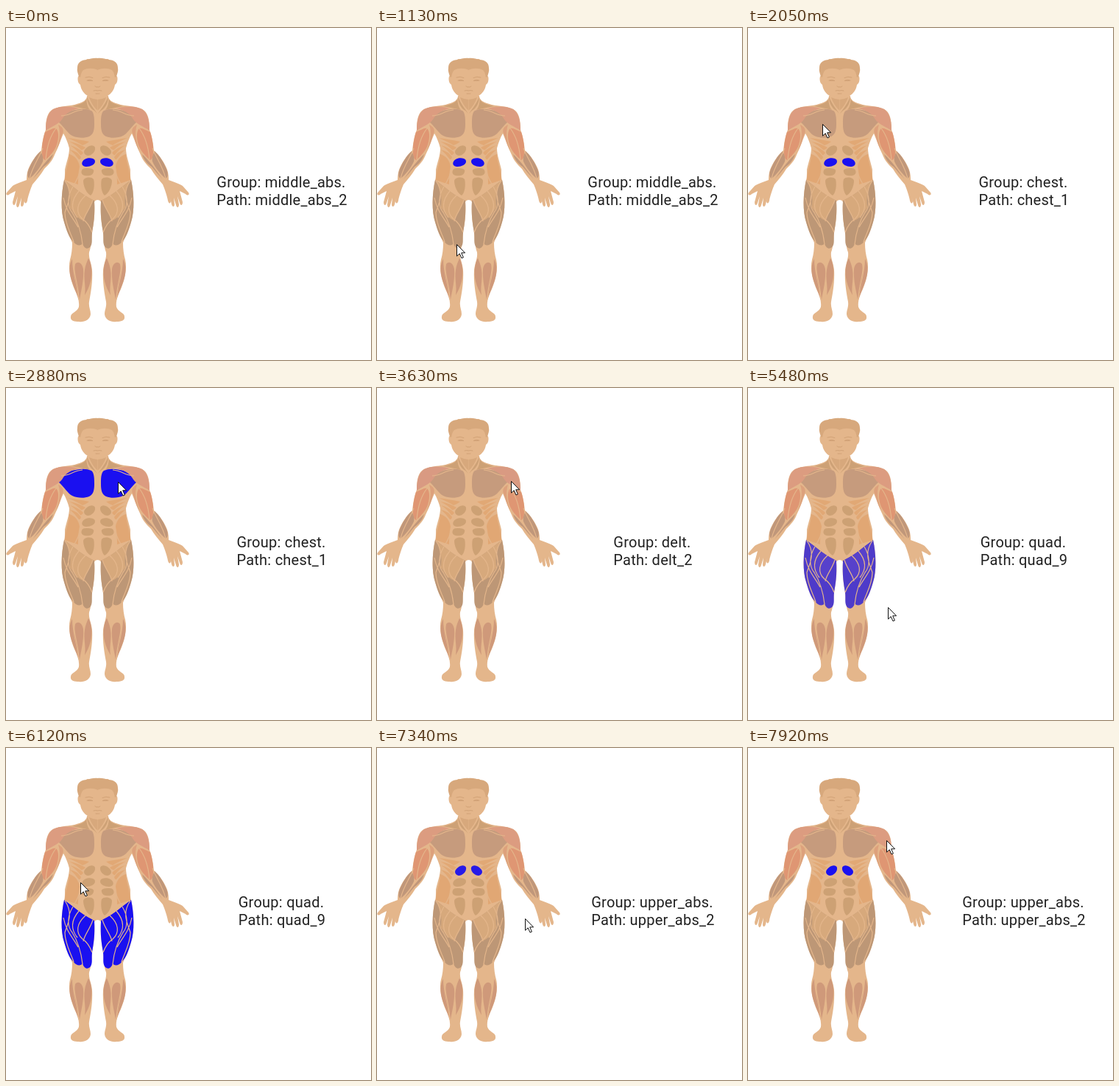
Recreate the animation shown at these times as an HTML page. Size 496 by 450 pixels, loop 8000 ms.

```html
<!DOCTYPE html>
<html lang="en">
<head>
<meta charset="utf-8">
<title>Muscle map</title>
<style>
  html, body { margin: 0; width: 100%; height: 100%; overflow: hidden; background: #fff; }
  svg { display: block; width: 496px; height: 450px; }
  text { font: 20px Roboto, sans-serif; letter-spacing: .25px; fill: #212121; }
  .skin { fill: #e4b68b; }
  .line { fill: none; stroke: #e4b68b; stroke-width: 1.2; }
  .face { fill: none; stroke: #d0a074; stroke-width: .9; stroke-linecap: round; }
</style>
</head>
<body>
<svg viewBox="0 0 496 450">
  <g id="left"></g>
  <g id="right" transform="translate(249 0) scale(-1 1)"></g>
  <text id="group" y="215.5"></text>
  <text id="path" y="239.5"></text>
  <path id="cursor" fill="#fff" stroke="#111" d="M.5 .5V16.2L4.2 12.8 7 19 9.4 18 6.7 11.8H11.6Z"/>
</svg>
<script>
const LOOP = 8000;
const BLUE = '#1a10f0';
const $ = id => document.getElementById(id);

const BODY = `M125 92H110C110 98 104 101 93 104C83 106 72 106 64 110C56 114 54 124 54 138
  C50 148 49 158 48 166C40 173 34 182 30 192C28 198 28 203 28 206
  C21 209 13 211 9 214L1 223C-1 226 2 228 5 225L13 221 9 236C9 241 12 241 13 237L16 228 14 239
  C14 244 17 244 18 240L21 230 20 239C20 243 23 243 24 239L26 230 25 235C26 239 28 238 29 234
  C30 228 33 219 36 212C42 205 48 198 52 191C58 185 63 180 66 172C71 162 74 152 78 143
  C81 148 84 155 86 163C86 173 82 182 80 192C80 200 80 204 79 206
  C75 224 74 248 79 263C82 275 87 283 90 291C90 300 89 307 87 314C84 326 88 342 93 354
  C97 362 100 370 99 378C97 385 88 386 88 391C87 397 93 398 99 398C106 399 114 396 115 388
  C115 382 112 378 113 371C115 360 118 345 117 328C116 318 112 312 113 304
  C116 296 116 286 117 277C120 262 121 248 120 236Q121 233 125 233Z`;

const HEAD = `M125 42H110L99 54V65C97 65 97 72 99 75L101 77C102 84 106 89 111 92Q118 95 125 95Z`;
const HAIR = `M125 41C119 40 114 42 110 43C102 43 97 47 97 54C96 58 98 62 99 66L101 67
  C102 63 102 60 105 57C111 54 118 54 125 57Z`;

// [group, fill, path data]
const MUSCLES = [
  ['neck', '#cda176', 'M110 93C113 101 119 109 124 116L120 112C114 109 110 101 110 93Z'],
  ['neck', '#cda176', 'M109 96C108 102 98 104 90 106C97 107 106 109 114 111C110 106 110 102 109 96Z'],
  ['neck', '#d7a87c', 'M113 94Q119 97 124.500 97V112C119 107 115 100 113 94Z'],
  ['chest', '#c69b7d', 'M71 127C76 117 85 112 95 111Q107 108 116 112C120 115 120 123 120 130C120 138 119 144 113 147C106 150 96 149 90 146C84 143 80 135 71 127Z'],
  ['delt', '#dc9c80', 'M54 139C54 126 56 116 64 110C74 105 89 106 99 109C90 111 83 114 78 121C73 130 65 132 54 139Z'],
  ['bicep', '#df9673', 'M53 141C59 139 64 135 68 136C73 141 71 154 68 161C64 169 58 175 53 179C48 176 49 168 49 160C50 153 51 147 53 141Z'],
  ['bicep', '#dda17c', 'M71 131C77 134 79 138 77 143C74 150 73 158 68 166C72 154 75 143 71 131Z'],
  ['forearm', '#c0977a', 'M47 167C50 173 51 177 50 181C46 190 39 198 32 204C28 202 29 196 31 191C35 182 40 173 47 167Z'],
  ['forearm', '#c0977a', 'M64 171C62 179 56 185 51 188C46 194 41 200 36 205C43 196 52 182 64 171Z'],
  ['oblique', '#e1a875', 'M84 149C93 150 103 152 113 154Q108 158 104 159Q96 154 84 149Z'],
  ['oblique', '#e1a875', 'M86 154Q98 156 108 162Q104 166 102 165Q95 158 86 154Z'],
  ['oblique', '#e1a875', 'M87 159Q98 162 105 169Q103 173 101 172Q95 164 87 159Z'],
  ['oblique', '#e1a875', 'M87 165Q97 167 102 175Q101 179 99 178Q94 171 87 165Z'],
  ['oblique', '#e1a774', 'M86 171C94 173 99 180 100 188C98 197 98 204 98 212Q88 209 80 206C80 194 86 182 86 171Z'],
  ['upper_abs', '#cda174', 'M121 162C122 168 116 173 111 173C106 172 105 168 107 165C111 159 119 157 121 162Z'],
  ['middle_abs', '#cda174', 'M121 181C121 185 115 188 109 188C104 188 102 184 104 181C106 177 113 175 118 177Q121 178 121 181Z'],
  ['lower_abs', '#cda174', 'M119 195C118 200 112 201 107 200C102 199 102 195 103 193C104 189 113 190 117 191Q120 192 119 195Z'],
  ['lower_abs', '#cda174', 'M119 205C121 213 119 224 115 227C109 224 105 214 105 207C106 202 116 201 119 205Z'],
  ['quad', '#bd9776', 'M79 206L91 215Q105 227 120 234C121 255 119 265 117 277C116 285 118 291 115 296C111 301 106 299 104 292C102 296 95 295 92 290C85 284 82 273 79 263C74 248 75 224 79 206Z'],
  ['quad', '#d7a97c', 'M80 207L91 215Q104 226 118 233C114 246 107 252 105 261C97 258 91 250 87 243C88 230 88 220 80 207Z'],
  ['calf', '#cf997a', 'M90 313C86 320 85 330 89 342C92 351 96 359 98 366C97 352 90 332 90 313Z'],
  ['calf', '#cf997a', 'M94 320C98 315 104 319 105 327C106 342 102 356 100 368C97 354 91 335 94 320Z'],
  ['calf', '#cf997a', 'M112 312C116 319 118 331 115 343C113 351 110 357 107 362C109 350 105 340 107 328C108 321 110 317 112 312Z'],
];

const DETAILS = `
  <path class="line" d="M75 119C87 119 91 112 104 111M68 136C61 145 56 156 54 178M50 163C45 176 36 187 32 204M92 213C99 202 101 195 101 182M92 316C92 336 99 350 99 368"/>
  <path class="line" d="M80 207C92 224 84 238 80 250C80 265 88 278 92 290M91 215C83 228 83 242 90 250C97 261 102 275 104 293M99 221C88 234 88 246 97 257M108 227C96 238 94 250 104 259Q112 264 117 277M118 233C114 246 107 252 105 262M78 230C82 250 92 258 98 270"/>
  <path class="face" d="M108 67Q113 65 118 67.500M110 71Q114 69 118 71.500H111M121 79Q123 81 125 80M119 85Q122 84 125 85M122 89H125"/>`;

const half = `<path class="skin" d="${BODY}"/><path class="skin" d="${HEAD}"/>
  <path fill="#d7a87c" d="${HAIR}"/>` +
  MUSCLES.map(([name, fill, d]) =>
    `<path data-name="${name}" data-fill="${fill}" fill="${fill}" d="${d}"/>`).join('') +
  DETAILS;
$('left').innerHTML = $('right').innerHTML = half;

// Each selection: click time, group, path number
const PICKS = [
  [-2000, 'middle_abs', 2],
  [2030, 'chest', 1],
  [3330, 'delt', 2],
  [4950, 'quad', 9],
  [6720, 'upper_abs', 2],
];

// Pointer stops: time, x, y
const POINTER = [
  [860, 130, 429], [1150, 108, 291], [1430, 84, 140], [1610, 101, 130],
  [2500, 101, 130], [3150, 182, 126], [3850, 182, 126], [4280, 150, 170],
  [4710, 108, 237], [4850, 103, 252], [5050, 103, 252], [5500, 190, 297], [5650, 190, 297],
  [5950, 150, 222], [6120, 101, 182], [6400, 110, 163], [6850, 110, 163],
  [7340, 201, 231], [7580, 187, 191], [7920, 188, 125],
];

const clamp = v => Math.max(0, Math.min(1, v));
const smooth = v => v * v * (3 - 2 * v);
const ramp = (t, from, to) => smooth(clamp((t - from) / (to - from)));
const rgb = hex => [1, 3, 5].map(i => parseInt(hex.slice(i, i + 2), 16));
const mix = (a, b, k) => {
  const end = rgb(b);
  return `rgb(${rgb(a).map((v, i) => Math.round(v + (end[i] - v) * k))})`;
};

const parts = PICKS.map(([, name]) => document.querySelectorAll(`[data-name="${name}"]`));

// The old group fades out first, then the new one fades in
function highlight(i, t) {
  const next = PICKS[i + 1];
  const shown = ramp(t, PICKS[i][0] + 270, PICKS[i][0] + 690);
  return next ? shown * (1 - ramp(t, next[0] + 50, next[0] + 290)) : shown;
}

function pointerAt(t) {
  const i = POINTER.findIndex(p => p[0] > t);
  if (i < 0) return POINTER.at(-1).slice(1);
  const [a, b] = [POINTER[i - 1], POINTER[i]];
  const k = smooth((t - a[0]) / (b[0] - a[0]));
  return [a[1] + (b[1] - a[1]) * k, a[2] + (b[2] - a[2]) * k];
}

let label = '';
function setLabel(name, number) {
  if (label === name) return;
  label = name;
  $('group').textContent = `Group: ${name}.`;
  $('path').textContent = `Path: ${name}_${number}`;
  const width = Math.max($('group').getComputedTextLength(), $('path').getComputedTextLength());
  for (const id of ['group', 'path']) $(id).setAttribute('x', 375 - width / 2);
}

function draw(t) {
  const [, name, number] = PICKS.findLast(p => p[0] <= t);
  setLabel(name, number);
  parts.forEach((els, i) => {
    const k = highlight(i, t);
    els.forEach(el => el.setAttribute('fill', mix(el.dataset.fill, BLUE, k)));
  });
  const visible = t >= POINTER[0][0];
  $('cursor').style.display = visible ? '' : 'none';
  if (visible) $('cursor').setAttribute('transform', `translate(${pointerAt(t).map(Math.round)})`);
}

const start = performance.now();
function tick() {
  draw((performance.now() - start) % LOOP);
  requestAnimationFrame(tick);
}
tick();
</script>
</body>
</html>
```
